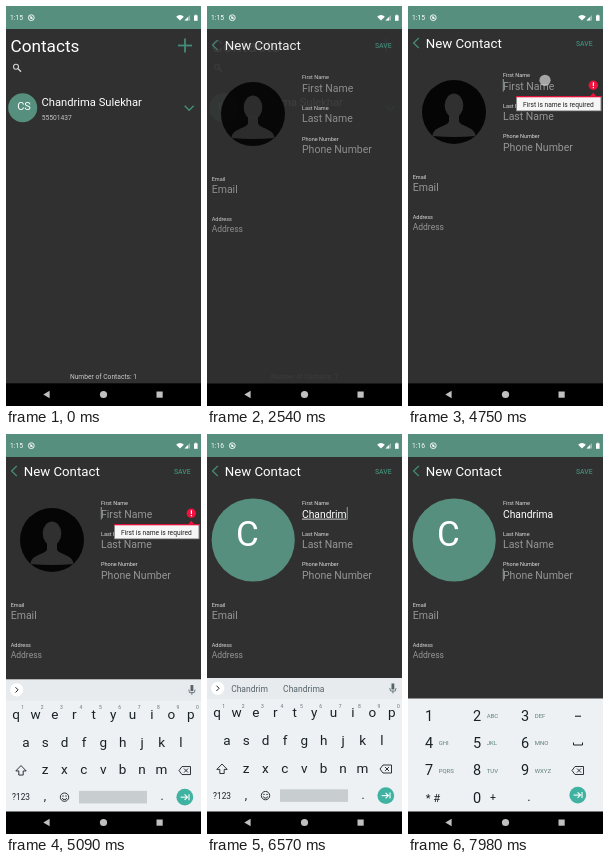
Recreate the animation shown at these times as an HTML page with a canvas. Size 195 by 400 pixels, loop 8000 ms.

```html
<!DOCTYPE html>
<html lang="en">
<head>
<meta charset="utf-8">
<title>Contacts</title>
<style>
html, body { margin: 0; width: 100%; height: 100%; overflow: hidden; background: #000; }
canvas { display: block; width: 195px; height: 400px; }
</style>
</head>
<body>
<canvas id="stage"></canvas>
<script>
const W = 195, H = 400, LOOP = 8000, TOP = 23, BOTTOM = 377.5;
const TEAL = '#578f7e', ACCENT = '#438b78', BG = '#303030', HINT = '#959595';
const INK = '#182125', KEY_BG = '#eef1f3', CARET = '#8fada4';
const NAME = 'Chandrima', SURNAME = 'Sulekhar', PHONE = '55501437';

const T = {
  addTap: [2180, 2380], open: 2400, saveTap: [3330, 3620], error: 3690,
  fieldTap: [4660, 4840], keys: 4890, minute: 5250, lastName: 6960, phone: 7500
};
const TYPED = [5480, 5690, 5880, 6010, 6140, 6270, 6400, 6520, 6680];

const canvas = document.getElementById('stage');
const dpr = window.devicePixelRatio || 1;
canvas.width = W * dpr;
canvas.height = H * dpr;
const c = canvas.getContext('2d');

const during = (t, [a, b]) => t >= a && t < b;
const easeOut = p => 1 - (1 - p) ** 3;
const progress = (t, from, length) => Math.min(1, Math.max(0, (t - from) / length));

function rect(x, y, w, h, color) {
  c.fillStyle = color;
  c.fillRect(x, y, w, h);
}

function disc(x, y, r, color) {
  c.fillStyle = color;
  c.beginPath();
  c.arc(x, y, r, 0, Math.PI * 2);
  c.fill();
}

function ring(x, y, r, color, width = 1) {
  c.strokeStyle = color;
  c.lineWidth = width;
  c.beginPath();
  c.arc(x, y, r, 0, Math.PI * 2);
  c.stroke();
}

function trace(points) {
  c.beginPath();
  for (let i = 0; i < points.length; i += 2) c.lineTo(points[i], points[i + 1]);
}

function line(points, color, width = 1) {
  c.strokeStyle = color;
  c.lineWidth = width;
  trace(points);
  c.stroke();
}

function poly(points, color) {
  c.fillStyle = color;
  trace(points);
  c.fill();
}

function text(s, x, y, size, color, align = 'left', weight = 400) {
  c.font = `${weight} ${size}px Roboto, sans-serif`;
  c.textAlign = align;
  c.fillStyle = color;
  c.fillText(s, x, y);
  return c.measureText(s).width;
}

function touch(x, y) {
  disc(x, y, 5.6, 'rgba(215,215,215,.7)');
}

function statusBar(t) {
  rect(0, 0, W, TOP, TEAL);
  text(t < T.minute ? '1:15' : '1:16', 4, 14.3, 6.7, '#fff');
  ring(25.3, 11.7, 2.9, '#eef5f2', 1);
  disc(25.3, 11.7, 1.2, '#eef5f2');
  line([23.3, 9.7, 27.3, 13.7], '#eef5f2', .8);
  c.fillStyle = '#fff';
  c.beginPath();
  c.moveTo(174, 14.5);
  c.arc(174, 14.5, 5.4, -Math.PI * .75, -Math.PI * .25);
  c.fill();
  poly([178.5, 14.5, 184, 14.5, 184, 9], 'rgba(255,255,255,.4)');
  poly([178.5, 14.5, 182, 14.5, 182, 11], '#fff');
  rect(188, 9.4, 3.6, 5.4, '#fff');
  rect(189, 8.7, 1.6, 1, '#fff');
}

function navBar() {
  rect(0, BOTTOM, W, H - BOTTOM, '#000');
  poly([37.3, 388.5, 43.6, 384.8, 43.6, 392.2], '#c0c0c0');
  disc(97.5, 388.5, 3.6, '#c0c0c0');
  rect(150.5, 385.5, 6.2, 6.2, '#c0c0c0');
}

function contactList(t) {
  rect(0, TOP, W, BOTTOM - TOP, BG);
  text('Contacts', 4.5, 46.3, 17.2, '#fff');
  line([172, 39.5, 186, 39.5], ACCENT, 1.8);
  line([179, 32.5, 179, 46.5], ACCENT, 1.8);
  ring(10, 60.7, 2.5, '#d0d0d0', 1.1);
  line([11.9, 62.6, 15, 65.8], '#d0d0d0', 1.4);
  disc(16.7, 101.8, 14.5, TEAL);
  text('CS', 18, 104.4, 11, '#fff', 'center');
  text(`${NAME} ${SURNAME}`, 35.5, 100, 11.2, '#fff');
  text(PHONE, 35.7, 114.4, 6.7, '#c4c4c4');
  line([178.7, 99.7, 183.2, 104.2, 187.7, 99.7], ACCENT, 1.5);
  text('Number of Contacts: 1', 97.5, 373, 6.7, '#c8c8c8', 'center');
  if (during(t, T.addTap)) touch(179, 39);
}

function blankAvatar() {
  disc(46, 106, 32, '#050505');
  c.fillStyle = BG;
  c.beginPath();
  c.ellipse(46, 99.5, 9.3, 12, 0, 0, Math.PI * 2);
  c.fill();
  c.beginPath();
  c.moveTo(24.5, 130);
  c.bezierCurveTo(25, 120, 40, 121, 41, 115);
  c.lineTo(41, 108);
  c.lineTo(51, 108);
  c.lineTo(51, 115);
  c.bezierCurveTo(52, 121, 67, 120, 67.5, 130);
  c.quadraticCurveTo(46, 132, 24.5, 130);
  c.fill();
}

function errorPopup() {
  disc(185.3, 79.3, 4.7, '#f0123c');
  rect(184.8, 76.3, 1.2, 3.8, '#fff');
  rect(184.8, 81, 1.2, 1.2, '#fff');
  poly([181.5, 91, 185.2, 86.8, 189, 91], '#f0123c');
  rect(108, 90, 85.5, 15.2, '#8a8a8a');
  rect(109, 91, 83.5, 13.4, '#f6f6f6');
  rect(108, 90, 85.5, 1.3, '#e0123c');
  text('First is name is required', 115, 101.3, 6.65, '#222');
}

function caret(t, since, x, y) {
  if ((t - since) % 1000 < 500) rect(x, y - 10.5, .9, 12.5, CARET);
}

function contactForm(t) {
  const count = TYPED.filter(at => t >= at).length;
  const value = NAME.slice(0, count);

  rect(0, TOP, W, BOTTOM - TOP, BG);
  line([10.8, 32, 5.6, 37, 10.8, 42], ACCENT, 1.3);
  text('New Contact', 17.7, 42, 13.25, '#fff');
  const pressed = during(t, T.saveTap);
  text('SAVE', 168, 39.5, 6.8, pressed ? '#386156' : ACCENT, 'left', 500);

  if (count) {
    disc(46.2, 106, 41.6, TEAL);
    text('C', 40.5, 111.6, 35, '#fff', 'center');
  } else blankAvatar();

  const field = (label, x, y, size = 10.5, gap = 12.6) => {
    text(label, x, y - gap, 5.5, '#dedede');
    if (label !== 'First Name' || !count) text(label, x, y, size, HINT);
  };
  field('First Name', 95, 83.5);
  field('Last Name', 95, 114.3);
  field('Phone Number', 95, 145);
  field('Email', 4.7, 185.3);
  field('Address', 4.7, 223.8, 8.5, 10.8);

  if (count) {
    const w = text(value, 95, 83.5, 10.3, '#fff');
    if (t < T.lastName) {
      rect(95, 84.7, w, .8, '#eee');
      caret(t, TYPED[count - 1], 95.3 + w, 83.5);
    }
  } else if (t >= T.error) {
    caret(t, T.error, 94.8, 83.5);
  }
  if (t >= T.phone) caret(t, T.phone, 94.8, 145);
  else if (t >= T.lastName) caret(t, T.lastName, 94.8, 114.3);

  if (t >= T.error && !count) errorPopup();
  if (pressed) touch(173.5, 38.3);
  if (during(t, T.fieldTap)) touch(137, 74.3);
}

function backspace(x, y) {
  c.strokeStyle = INK;
  c.lineWidth = .9;
  trace([x - 6, y, x - 3, y - 4, x + 5.5, y - 4, x + 5.5, y + 4, x - 3, y + 4]);
  c.closePath();
  c.stroke();
  line([x - 1, y - 2, x + 3, y + 2], INK, .9);
  line([x + 3, y - 2, x - 1, y + 2], INK, .9);
}

function nextKey(x, y) {
  disc(x, y, 8.4, '#3fb2a1');
  line([x - 4.2, y, x + 2.6, y], '#fff', 1.1);
  line([x - .2, y - 2.8, x + 2.6, y, x - .2, y + 2.8], '#fff', 1.1);
  line([x + 4.2, y - 3, x + 4.2, y + 3], '#fff', 1.1);
}

function suggestions(count, t) {
  rect(0, 244, W, 21, '#e7ebed');
  disc(10.7, 254.3, 6.6, '#fff');
  line([9.5, 251.7, 12.1, 254.3, 9.5, 256.9], INK, 1);
  rect(184.5, 249.5, 2.8, 6, '#56636a');
  line([182.8, 254, 183.5, 257, 188.3, 257, 189, 254], '#56636a', .8);
  line([185.9, 257, 185.9, 259.3], '#56636a', .9);
  if (!count || t >= T.lastName) return;
  const words = count === 1 ? ['C', 'Can', 'Call']
    : count === 2 ? ['Ch', 'Check', 'Christmas']
    : [NAME.slice(0, count), count < NAME.length ? NAME : ''];
  words.forEach((word, i) => text(word, 42.5 + 54.3 * i, 257.5, 8.5, '#55636a', 'center'));
}

function letterKeys(t) {
  rect(0, 244, W, 134, KEY_BG);
  suggestions(TYPED.filter(at => t >= at).length, t);
  const row = (letters, x, y) => [...letters].forEach((k, i) =>
    text(k, x + 19.4 * i, y, 13.5, INK, 'center'));
  row('qwertyuiop', 10.1, 283);
  row('asdfghjkl', 19.8, 311);
  row('zxcvbnm', 39, 338.8);
  [...'1234567890'].forEach((n, i) => text(n, 16.7 + 19.4 * i, 273.6, 5, '#66737a', 'center'));

  c.strokeStyle = INK;
  c.lineWidth = .9;
  trace([15, 330, 9.8, 335.4, 12.8, 335.4, 12.8, 339.5, 17.2, 339.5, 17.2, 335.4, 20.2, 335.4]);
  c.closePath();
  c.stroke();
  backspace(179, 335);

  text('?123', 15, 364.6, 8.3, INK, 'center');
  text(',', 39, 364.6, 12, INK, 'center');
  ring(58.5, 361.6, 4.2, INK, .9);
  disc(57, 360.4, .7, INK);
  disc(60, 360.4, .7, INK);
  c.beginPath();
  c.arc(58.5, 362, 2.2, .2, Math.PI - .2);
  c.stroke();
  rect(73, 355.3, 68, 12.6, '#c8cdd0');
  text('.', 156, 364.6, 12, INK, 'center');
  nextKey(178.8, 361.6);
}

function numberKeys() {
  rect(0, 264.5, W, 113.5, KEY_BG);
  const groups = ['', 'ABC', 'DEF', 'GHI', 'JKL', 'MNO', 'PQRS', 'TUV', 'WXYZ'];
  groups.forEach((g, i) => {
    const x = 21 + 48 * (i % 3), y = 287 + 27.2 * Math.floor(i / 3);
    text(i + 1, x, y, 14.5, INK, 'center');
    text(g, x + 9.7, y - 2.8, 6, '#5a7f78');
  });
  text('* #', 25, 367.8, 11.3, INK, 'center');
  text('0', 69, 368.6, 14.5, INK, 'center');
  text('+', 85, 367.4, 10.5, INK, 'center');
  text('.', 121, 367.4, 13, INK, 'center');
  line([167, 282.2, 173, 282.2], INK, 1.1);
  line([165.5, 308.5, 165.5, 311, 174.5, 311, 174.5, 308.5], INK, 1);
  backspace(170, 336.5);
  nextKey(169.8, 361.1);
}

function keyboard(t) {
  if (t < T.keys) return;
  c.save();
  c.translate(0, 133 * (1 - easeOut(progress(t, T.keys, 260))));
  if (t < T.phone) letterKeys(t);
  else numberKeys();
  c.restore();
}

function draw(t) {
  c.setTransform(dpr, 0, 0, dpr, 0, 0);
  const opened = easeOut(progress(t, T.open, 240));
  if (opened < 1) contactList(t);
  if (opened > 0) {
    c.save();
    c.globalAlpha = opened;
    c.translate(0, 30 * (1 - opened));
    contactForm(t);
    c.restore();
  }
  keyboard(t);
  statusBar(t);
  navBar();
}

const start = performance.now();
function tick() {
  draw((performance.now() - start) % LOOP);
  requestAnimationFrame(tick);
}
tick();
</script>
</body>
</html>
```
